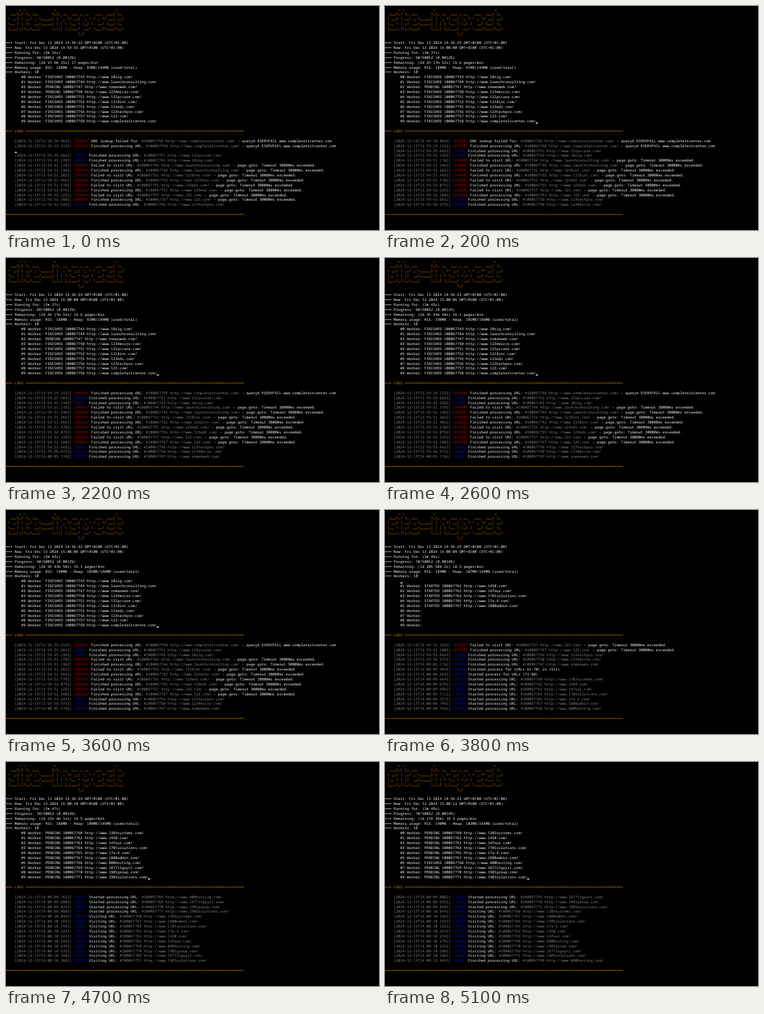
These frames come from a looping animation (600x360 px, 5.3 s). An HTML page:

```html
<!DOCTYPE html>
<html lang="en">
<head>
<meta charset="utf-8">
<title>site-inspect</title>
<style>
  html, body { margin: 0; width: 100%; height: 100%; overflow: hidden; background: #000; }
  /* Laid out on a 36 px column grid, then scaled to 3.515 px per column. */
  #screen {
    position: absolute; left: 0; top: 0; width: 6140px; height: 3680px;
    transform: scale(.09764); transform-origin: 0 0;
    font: 60px/80.7px "Noto Sans Mono", "DejaVu Sans Mono", monospace;
    font-variant-ligatures: none; text-rendering: geometricPrecision;
    color: #f2f2f2; white-space: pre;
  }
  .row { position: absolute; left: 0; height: 80.7px; }
  .amber { color: #d98a00; }
  .dim { color: #808080; }
  .red { color: #a80000; }
  .blue { color: #0010b0; }
  #cursor { position: absolute; width: 36px; height: 15px; background: #fff; }
</style>
</head>
<body>
<div id="screen"></div>
<script>
const LOOP = 5300, PITCH = 80.7, COL = 36;
const WORKER_ROW = 14, LOG_ROW = 27, LOG_SIZE = 14;

const banner = String.raw`
      _ _             _                           _
  ___(_) |_ ___      (_)_ __  ___ _ __   ___  ___| |_
 / __| | __/ _ \_____| | '_ \/ __| '_ \ / _ \/ __| __|
 \__ \ | ||  __/_____| | | | \__ \ |_) |  __/ (__| |_
 |___/_|\__\___|     |_|_| |_|___/ .__/ \___|\___|\__|
                                 |_|`.slice(1).split('\n');

const sites = {
  43: '10zig', 44: 'launchconsulting', 47: 'romanweb', 50: '1234micro', 51: '121pccare',
  52: '1218inc', 55: '123edi', 56: '123techpro', 57: '123', 58: 'completeitcenter',
  60: '1303systems', 62: '1450', 63: '14four', 64: '1701solutions', 65: '17a-4',
  67: '1800admin', 68: '800hosting', 69: '1877itguys1', 70: '1901group', 71: '1903solutions'
};
const ids = Object.keys(sites);
const page = id => `1000677${id} http://www.${sites[id]}.com/`;

const statuses = { F: ' FINISHED ', P: ' PENDING ', S: ' STARTED ' };
const timeout = () => 'page.goto: Timeout 30000ms exceeded.';
const query = id => `queryA ESERVFAIL www.${sites[id]}.com`;

// kind: [message, error detail]
const kinds = {
  D: ['DNS lookup failed for', query],
  Q: ['Finished processing URL', query],
  E: ['Failed to visit URL', timeout],
  X: ['Finished processing URL', timeout],
  F: ['Finished processing URL'],
  S: ['Started processing URL'],
  V: ['Visiting URL']
};
// seconds, kind, site
const log = `18.863 D 58,19.212 Q 58,25.682 F 51,45.239 F 43,51.178 E 44,51.196 X 44,
51.282 E 52,51.456 X 52,51.578 E 55,52.075 X 55,52.225 E 57,52.260 X 57,53.642 F 56,58.973 F 50,
05.174 F 47,09.445 Finished process for (URLs 61-70) in (51s),09.453 Started process for URLs (71-80),
09.644 S 60,09.676 S 62,09.696 S 63,09.711 S 64,09.727 S 65,09.749 S 67,09.762 S 68,
09.808 S 69,09.835 S 70,09.860 S 71,10.044 V 60,10.165 V 67,10.193 V 64,10.222 V 65,
10.247 V 62,10.259 V 63,10.279 V 68,10.335 V 70,10.350 V 69,10.368 V 71,12.945 F 68`
  .split(/,\s*/);

// clock, running, progress, remaining, rate, rss, heap
const stats = [
  ['14:59:55', '3m 32s', '60/50052 (0.0012%)', '2d 1h 9m 15s', '17', 188, '83MB/144MB'],
  ['15:00:00', '3m 37s', '60/50052 (0.0012%)', '2d 2h 17m 52s', '16.6', 188, '91MB/144MB'],
  ['15:00:06', '3m 43s', '60/50052 (0.0012%)', '2d 3h 43m 58s', '16.1', 190, '101MB/146MB'],
  ['15:00:09', '3m 46s', '70/50052 (0.0014%)', '1d 20h 58m 2s', '18.5', 189, '107MB/145MB'],
  ['15:00:10', '3m 47s', '70/50052 (0.0014%)', '1d 21h 4m 12s', '18.5', 188, '109MB/145MB'],
  ['15:00:12', '3m 49s', '70/50052 (0.0014%)', '1d 21h 36m', '18.3', 190, '103MB/145MB']
];

// Without a cursor place it rests after the last worker; "wipe" empties its row.
const steps = [
  { t: 0, stat: 0, work: 'FFPPFFFFFF', end: 14, cursor: [29, 4], wipe: true },
  { t: 100, stat: 0, work: 'FFPPFFFFFF', end: 14 },
  { t: 200, stat: 1, work: 'FFPFFFFFFF', end: 14 },
  { t: 2000, stat: 1, work: 'FFPFFFFFFF', end: 14, cursor: [27, 4] },
  { t: 2200, stat: 1, work: 'FFPFFFFFFF', end: 15 },
  { t: 2300, stat: 2, work: 'FFFFFFFFFF', end: 15 },
  { t: 3700, stat: 3, work: 'SSS-------', batch: 10, end: 20 },
  { t: 3800, stat: 3, work: 'SSSSSS----', batch: 10, end: 24, cursor: [14, 7], wipe: true },
  { t: 3900, stat: 3, work: 'SSSSSSSSSS', batch: 10, end: 27 },
  { t: 4000, stat: 4, work: 'PPPPPPPSSS', batch: 10, end: 34 },
  { t: 4100, stat: 4, work: 'PPPPPPPPPP', batch: 10, end: 37 },
  { t: 5100, stat: 5, work: 'PPPPPPFPPP', batch: 10, end: 38 }
];

const screen = document.getElementById('screen');
const rows = Array.from({ length: 43 }, (_, i) => {
  const el = document.createElement('div');
  el.className = 'row';
  el.style.top = i * PITCH - 1 + 'px';
  return screen.appendChild(el);
});
const cursor = screen.appendChild(document.createElement('div'));
cursor.id = 'cursor';

const paint = (css, text) => `<span class="${css}">${text}</span>`;

function header([clock, run, done, left, rate, rss, heap]) {
  const day = 'Fri Dec 13 2024', zone = 'GMT+0100 (UTC+01:00)';
  return [
    `Start: ${day} 14:56:23 ${zone}`,
    `Now: ${day} ${clock} ${zone}`,
    `Running for: (${run})`,
    `Progress: ${done}`,
    `Remaining: (${left}) ${rate} pages/min`,
    `Memory usage: RSS: ${rss}MB - Heap: ${heap} (used/total)`,
    'Workers: 10'
  ].map(s => '=== ' + s);
}

function worker(state, i, batch) {
  const job = statuses[state] ? statuses[state] + page(ids[batch + i]) : '';
  return `       #${i} Worker:${job}`;
}

function logLine(i) {
  const [, sec, rest] = log[i].match(/^(\S+) (.*)$/);
  const [key, id] = rest.split(' ');
  const kind = kinds[key];
  const detail = kind && kind[1];
  const stamp = `[2024-12-13T${i < 14 ? '13:59' : '14:00'}:${sec}Z]`;
  const level = detail ? paint('red', '[ERROR]') : paint('blue', '[INFO]');
  const text = kind
    ? `${kind[0]}: ${paint('dim', '#' + page(id))}${detail ? ' - ' + detail(id) : ''}`
    : rest;
  return `    ${paint('dim', stamp)} ${level} ${text}`;
}

function draw(step) {
  const lines = Array(43).fill('');
  const rule = '='.repeat(100);
  banner.forEach((s, i) => lines[i] = paint('amber', s));
  header(stats[step.stat]).forEach((s, i) => lines[7 + i] = s);
  [...step.work].forEach((s, i) => lines[WORKER_ROW + i] = worker(s, i, step.batch || 0));
  lines[25] = paint('amber', '=== LOGS ' + rule);
  lines[42] = paint('amber', '='.repeat(9) + rule);

  const [row, col] = step.cursor || [23, lines[23].length];
  for (let i = 0; i < LOG_SIZE; i++) {
    // Rows below a wiped log row still hold the previous scroll position.
    const stale = step.wipe && row >= LOG_ROW && LOG_ROW + i > row;
    lines[LOG_ROW + i] = logLine(step.end - LOG_SIZE + i - (stale ? 1 : 0));
  }
  if (step.wipe) lines[row] = '';

  lines.forEach((s, i) => { if (rows[i].innerHTML !== s) rows[i].innerHTML = s; });
  cursor.style.left = col * COL + 'px';
  cursor.style.top = row * PITCH + 62 + 'px';
}

let shown = null;
const began = performance.now();
function tick() {
  const t = (performance.now() - began) % LOOP;
  const step = steps.filter(s => s.t <= t).pop();
  if (step !== shown) draw(shown = step);
  requestAnimationFrame(tick);
}
tick();
</script>
</body>
</html>
```
